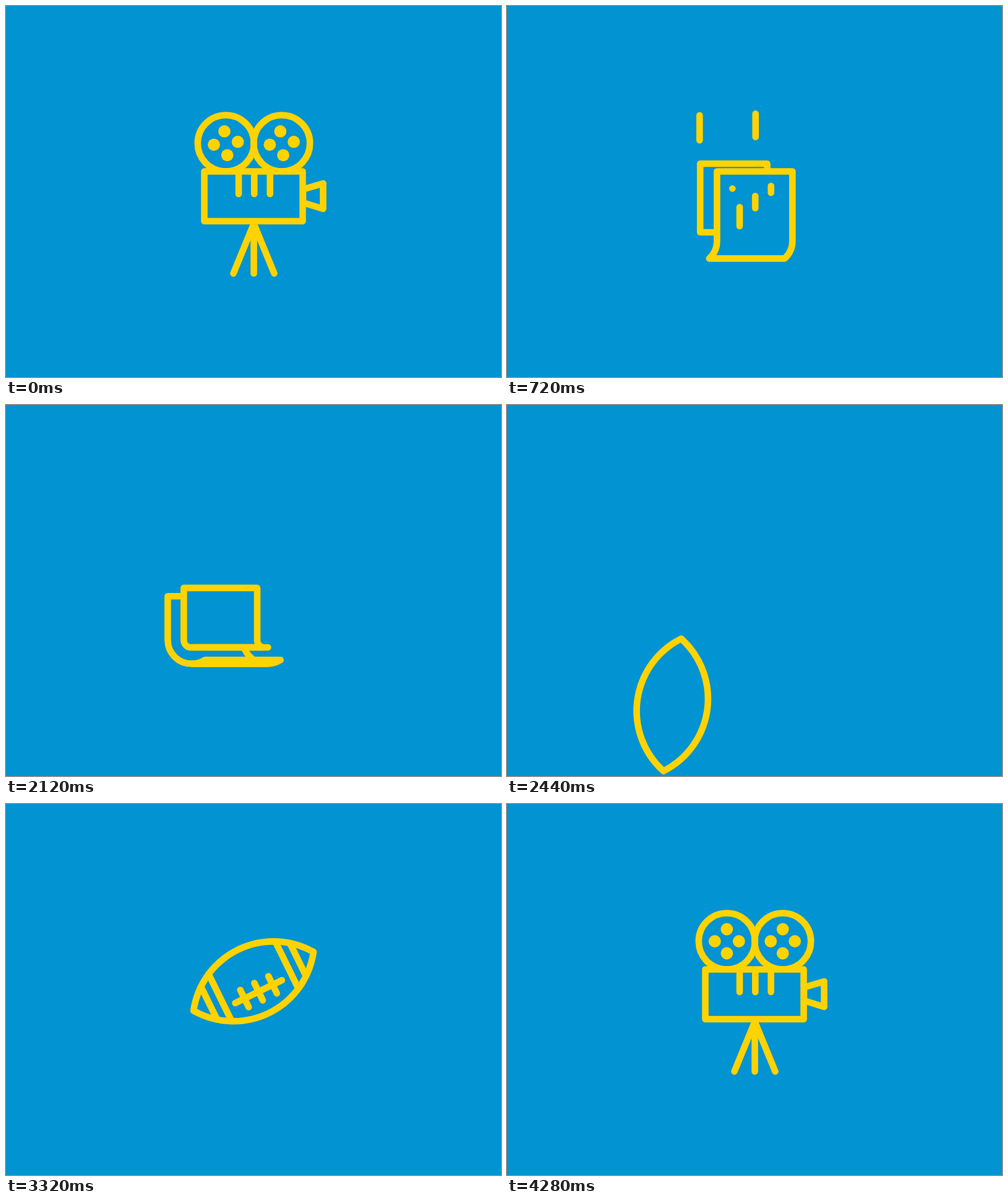
Write an HTML page that moves like this. It is 800 by 600 pixels and loops after 4.32 s.

```html
<!DOCTYPE html>
<html lang="en">
<head>
<meta charset="utf-8">
<title>Icon loop</title>
<style>
  html, body { margin: 0; width: 100%; height: 100%; overflow: hidden; background: #0293d2; }
  svg { display: block; width: 100vw; height: 100vh; }
  #scene { fill: none; stroke: #ffd300; stroke-width: 10.6; stroke-linecap: round; stroke-linejoin: round; }
  .solid { fill: #0293d2; }
  .dot { fill: #ffd300; stroke: none; }
</style>
</head>
<body>
<svg viewBox="0 0 800 600"><g id="scene"></g></svg>
<script>
const LOOP = 4320;
const FOLD = 380; // height where the newspaper sheets begin to curl
const scene = document.getElementById('scene');

const lerp = (a, b, k) => a + (b - a) * k;
const span = (t, from, to) => Math.min(1, Math.max(0, (t - from) / (to - from)));
const sine = k => (1 - Math.cos(Math.PI * k)) / 2;
const cubicIn = k => k ** 3;
const cubicOut = k => 1 - (1 - k) ** 3;
const smooth = (t, from, to) => sine(span(t, from, to));

const line = (x1, y1, x2, y2) => `<path d="M${x1} ${y1}L${x2} ${y2}"/>`;
const solid = d => `<path class="solid" d="${d}"/>`;

// A page whose sides bend along a cylinder below the fold; side is the bend direction.
function sheet(left, right, top, bottom, r, side) {
  const bend = y => y <= FOLD ? 0 : side * (r - Math.sqrt(Math.max(0, r * r - (y - FOLD) ** 2)));
  const sweep = side < 0 ? 1 : 0;
  const shoulder = Math.max(top, FOLD);
  let d = `M${left + bend(top)} ${top}`;
  if (bottom > FOLD) {
    d += `L${left + bend(shoulder)} ${shoulder}A${r} ${r} 0 0 ${sweep} ${left + bend(bottom)} ${bottom}`
      + `H${right + bend(bottom)}A${r} ${r} 0 0 ${1 - sweep} ${right + bend(shoulder)} ${shoulder}`;
  } else {
    d += `V${bottom}H${right}`;
  }
  return solid(d + `L${right + bend(top)} ${top}Z`);
}

function reel(cx, t, endY, endHalf) {
  const grow = t > 3000 ? cubicOut(span(t, 3640, 4040)) : 1;
  if (t > 3000 && !grow) return '';
  const r = 45.5 * grow;
  let rx = r, ry = r, cy = 267.5 - r, x = cx;
  let dots = smooth(t, 3780, 4080);
  if (t < 3000) {
    const squash = smooth(t, 400, 600);
    const shrink = span(t, 600, 720);
    rx = lerp(45.5, 0, squash);
    ry = lerp(45.5, endHalf, shrink);
    if (t > 720) ry *= 1 - span(t, 720, 800);
    cy = lerp(222 - 55 * smooth(t, 140, 400), 200, squash);
    cy = lerp(cy, endY, shrink);
    x = cx - 45.5 + rx + 1.5 * squash;
    dots = 1 - smooth(t, 260, 420);
    if (t > 800) return '';
  }
  let out = rx > 0.5 ? `<ellipse cx="${x}" cy="${cy}" rx="${rx}" ry="${ry}"/>` : line(x, cy - ry, x, cy + ry);
  const turn = -600 * sine(span(t > 3000 ? t - LOOP : t, -40, 560)) * Math.PI / 180;
  for (let i = 0; i < 4; i++) {
    const a = turn + i * Math.PI / 2;
    out += `<circle class="dot" cx="${x + 19.5 * Math.cos(a)}" cy="${cy + 19.5 * Math.sin(a)}" r="${9.9 * dots}"/>`;
  }
  return out;
}

function reels(t) {
  return reel(355.3, t, 197, 20.5) + reel(445.7, t, 193, 19);
}

function stand(t) {
  const late = t > 3000;
  const legs = late ? cubicOut(span(t, 3760, 4128)) : 1 - smooth(t, 100, 420);
  const lens = late ? cubicOut(span(t, 3788, 4188)) : 1 - smooth(t, 60, 380);
  let out = '';
  if (lens > 0) {
    const dx = -38 * (1 - lens);
    out += `<path d="M${480 + dx} 296.5L${512.5 + dx} 287V328L${480 + dx} 318Z"/>`;
  }
  if (legs > 0) {
    for (const dx of [-33, 0, 33]) out += line(400.5, 352, 400.5 + dx * legs, 352 + 80.5 * legs);
  }
  return out;
}

function bars(t) {
  if (t > 820 && t < 3000) return '';
  const fall = t < 3000 ? span(t, 580, 720) : 0;
  const fade = t < 3000 ? span(t, 720, 820) : 0;
  return [[376, 325, 356], [401.2, 307, 327], [426.7, 291, 302]].map(([x, top, bottom]) => {
    const y2 = lerp(304, bottom, fall);
    return line(x, lerp(lerp(268, top, fall), y2, fade), x, y2);
  }).join('');
}

function text(t) {
  return [[295.2, 710, 1353], [318.7, 745, 1388], [342.2, 810, 1453]].map(([y, from, to], i) => {
    const gone = smooth(t, 1720 + 30 * i, 1860 + 30 * i);
    if (t < from || gone === 1) return '';
    return line(364.3, y, 364.3 + 72 * smooth(t, from, to) * (1 - gone), y);
  }).join('');
}

function newspaper(t) {
  const close = smooth(t, 2310, 2420);
  if (close === 1) return '';
  const page = (left, right, ...rest) => sheet(lerp(left, 360, close), lerp(right, 360, close), ...rest);
  let out = '';

  const backFall = cubicIn(span(t, 2040, 2320));
  if (t > 790) {
    const top = lerp(lerp(418.4, 306.5, smooth(t, 780, 1320)), 418.4, backFall);
    out += page(261.4, 383, top, 418.4, 38.4, 1);
  }
  if (t > 820) {
    const top = lerp(lerp(392, 293.5, smooth(t, 810, 1260)), 392, backFall);
    out += page(287.3, 406, top, 392, 12.3, 1);
  }
  if (t > 560) {
    const out1 = smooth(t, 560, 700);
    const drop = smooth(t, 720, 860);
    const top = lerp(lerp(lerp(272, 255, out1), 280.5, drop), 392, cubicIn(span(t, 1800, 2110)));
    out += page(lerp(345, 312.2, out1), lerp(420.5, 433, drop), top, lerp(366, 392, drop), 12.3, -1);
  }

  const narrow = smooth(t, 440, 660);
  const frontTop = lerp(267.5, 418.4, cubicIn(span(t, 1760, 2126)));
  out += page(lerp(320.5, 339.4, narrow), lerp(479.5, 461.3, narrow), frontTop,
    lerp(348, 418.4, smooth(t, 500, 793)), 38.4, -1);
  return out;
}

// Football outline that flattens into the camera body as k goes from 0 to 1.
function ballOutline(k) {
  const half = lerp(108, 79.5, k);
  const height = s => lerp(Math.sqrt(130.8 ** 2 - (108 * s) ** 2) - 73.8, 40.25, k);
  const upper = [], lower = [];
  for (let i = -20; i <= 20; i++) {
    const s = i / 20, y = Math.max(0, height(s));
    upper.push(`${half * s} ${-y}`);
    lower.unshift(`${half * s} ${y}`);
  }
  return 'M' + upper.concat(lower).join('L') + 'Z';
}

function ball(t) {
  const away = 493 * (1 - span(t, 2260, 3350)) ** 4;
  const morph = smooth(t, 3420, 3720);
  const angle = lerp(-26.1 - 0.236 * away, 0, morph);
  const x = lerp(400 - 0.557 * away, 400, morph);
  const y = lerp(286.8 + 0.831 * away, 307.75, morph);
  let out = solid(ballOutline(morph));

  const strip = 1 - smooth(t, 3400, 3540);
  for (const [sx, h, from] of [[80, 29.5, 2545], [60, 42.4, 2566], [-60, 42.4, 2595], [-80, 29.5, 2661]]) {
    const grown = smooth(t, from, from + 240) * strip;
    if (grown > 0) out += line(sx, -h, sx, lerp(-h, h, grown));
  }

  const lace = span(130 - away, 0, 50);
  if (lace > 0) {
    const ly = lerp(18.6 - 0.247 * away, -21.75, morph);
    const half = 42 * lace * strip;
    const tick = lerp(15.5, 18, morph) * lace;
    if (half > 0) out += line(-half, ly, half, ly);
    for (const tx of [-25.3, 0, 25.3]) {
      const px = tx + 1.3 * morph;
      out += line(px, ly - tick, px, ly + tick);
    }
  }
  return `<g transform="translate(${x} ${y}) rotate(${angle})">${out}</g>`;
}

function draw(t) {
  let out = '';
  if (t < 3000) {
    out += stand(t) + reels(t) + newspaper(t) + bars(t) + text(t);
    if (t > 2260) out += ball(t);
  } else {
    out += stand(t) + reels(t) + ball(t);
  }
  scene.innerHTML = out;
}

const start = performance.now();
function tick() {
  draw((performance.now() - start) % LOOP);
  requestAnimationFrame(tick);
}
tick();
</script>
</body>
</html>
```
